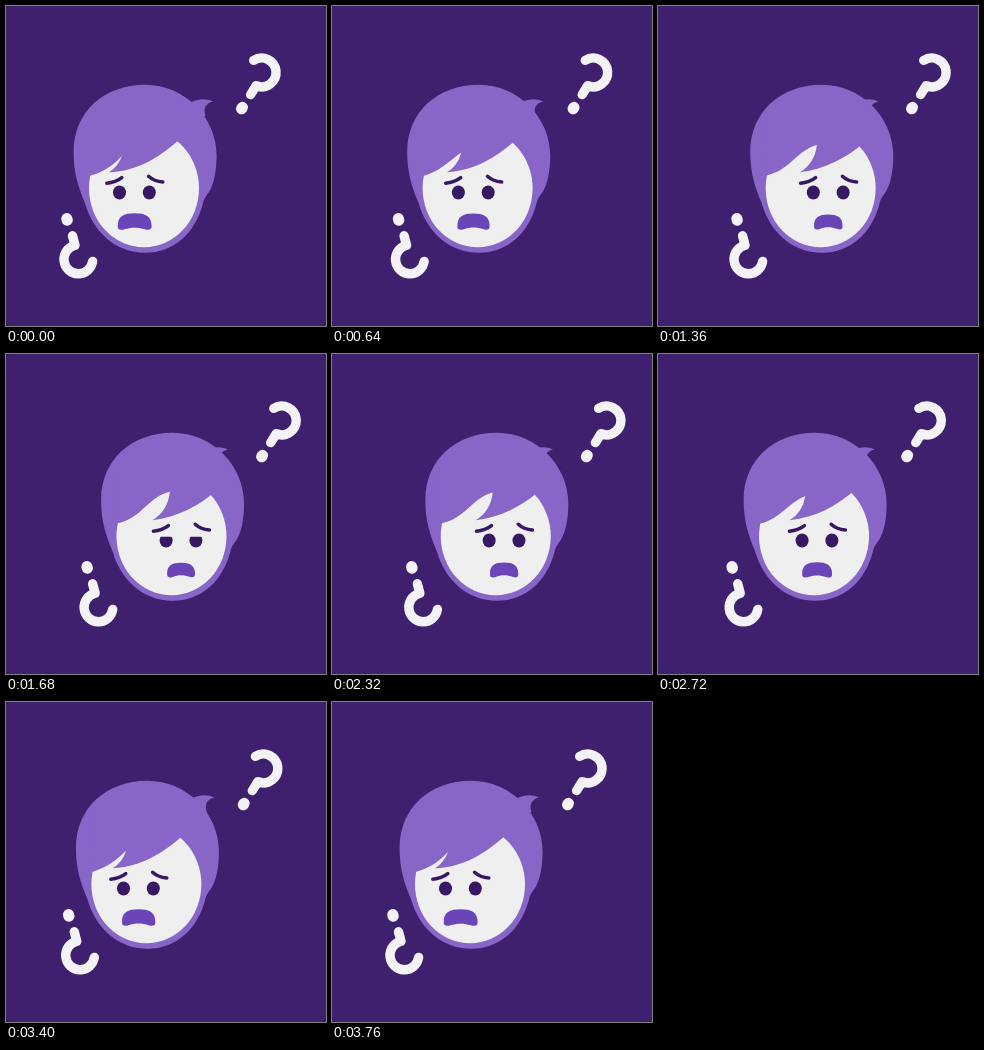
Write an HTML page that moves like this. It is 320 px wide and 320 px high and loops after 3.8 s.

```html
<!DOCTYPE html>
<html lang="en">
<head>
<meta charset="utf-8">
<title>Confused head</title>
<style>
  html, body { margin: 0; width: 100%; height: 100%; overflow: hidden; background: #3f206e; }
  svg { display: block; width: 100vw; height: 100vh; }
  .hair { fill: #8866c8; }
  .skin { fill: #efefef; }
  .dark { fill: #381863; }
  .brow { fill: none; stroke: #381863; stroke-width: 3.5; stroke-linecap: round; }
  .mark path { fill: none; stroke: #f3f2f4; stroke-width: 9.4; stroke-linecap: round; stroke-linejoin: round; }
  .mark .dot { stroke-width: 11.2; }
</style>
</head>
<body>
<svg viewBox="0 0 320 320">
  <g id="marks" class="mark">
    <path d="M247.7 54.4A14.4 14.4 0 1 1 250.1 79.7L244.6 88.6"/>
    <path class="dot" d="M236.4 101.4L235.6 102.7"/>
    <path d="M66.5 229.8L69 239.3A14.4 14.4 0 1 0 86.6 255.4"/>
    <path class="dot" d="M60.8 212.7L61.2 214.1"/>
  </g>
  <path id="tuft" class="hair" d="M177 102C184 95 196 90 207 95.5C200 97 197 102 199.5 110L185 115Z"/>
  <g id="head">
    <path class="hair" d="M67.6 146C67.6 106 98 78.8 139 78.8C179 78.8 210.6 111.5 210.6 150C210.6 166 207.5 179 203 186C200 190.5 197.5 193 196.8 198C189 227 168 246.8 139 246.8C110 246.8 87 226 79 197C72 181 67.6 166 67.6 146Z"/>
    <ellipse class="skin" cx="138" cy="182.3" rx="55" ry="59"/>
  </g>
  <path id="fringe" class="hair"/>
  <g id="eyes">
    <ellipse class="dark" cx="113.5" cy="186.5" rx="6.5" ry="7"/>
    <ellipse class="dark" cx="143.3" cy="186.5" rx="6.5" ry="7"/>
    <rect class="skin lid" x="106" y="178" width="15" height="0"/>
    <rect class="skin lid" x="136" y="178" width="15" height="0"/>
    <path class="brow" d="M100.8 177.2Q109.7 176.6 115.8 171.7"/>
    <path class="brow" d="M142.6 170.3Q148 175.4 156.8 176"/>
  </g>
  <path id="mouth" fill="#6b44b8"/>
</svg>
<script>
const LOOP = 3800, TURN = 1760, BACK = 2000;
const el = id => document.getElementById(id);
const lids = document.querySelectorAll('.lid');
const clamp = v => Math.min(1, Math.max(0, v));
const mix = (a, b, k) => a + (b - a) * k;
const smooth = v => v * v * (3 - 2 * v);

// cubic-bezier(.42, 0, .58, 1)
function ease(x) {
  let lo = 0, hi = 1;
  for (let i = 0; i < 24; i++) {
    const s = (lo + hi) / 2, r = 1 - s;
    if (1.26 * r * r * s + 1.74 * r * s * s + s * s * s < x) lo = s; else hi = s;
  }
  return smooth((lo + hi) / 2);
}

// Hair edge with the head turned left and right
const fringeCmds = ['M', 'C', ' ', ' ', 'Q', ' ', 'C', ' ', ' ', 'L', 'L'];
const fringeLeft = [80, 171, 96, 167, 107, 160, 116, 149.8, 112, 161, 103, 166.3,
  132, 165, 152, 152, 173, 134, 188, 117, 80, 117];
const fringeRight = [108, 170, 136, 166, 141, 143, 164, 137.7, 162, 157, 146.5, 166.3,
  172, 163, 192, 152, 209, 138, 225, 117, 108, 117];

function fringePath(k) {
  const p = fringeLeft.map((v, i) => mix(v, fringeRight[i], k).toFixed(2));
  return fringeCmds.map((c, i) => c + p[2 * i] + ' ' + p[2 * i + 1]).join('') + 'Z';
}

function mouthPath(k) {
  const cx = mix(128.6, 175.2, k), w = mix(17, 14, k);
  const top = mix(207.2, 208.7, k), low = mix(224, 223.6, k);
  const p = (x, y) => (cx + x * w).toFixed(2) + ' ' + y.toFixed(2) + ' ';
  return 'M' + p(-.99, low - 4) +
    'C' + p(-1, top + 3) + p(-.65, top) + p(0, top) +
    'C' + p(.65, top) + p(1, top + 3) + p(1, low - 4) +
    'C' + p(1.02, low) + p(.82, low + .3) + p(.6, low - .8) +
    'C' + p(.25, low - 2.9) + p(-.25, low - 2.9) + p(-.6, low - .7) +
    'C' + p(-.82, low + .4) + p(-1.02, low) + p(-.99, low - 4) + 'Z';
}

const slide = (id, x) => el(id).setAttribute('transform', `translate(${x.toFixed(3)} 0)`);

function draw(t) {
  const k = t < BACK ? ease(clamp(t / TURN)) : 1 - ease(clamp((t - BACK) / TURN));
  slide('marks', 20.2 * k);
  slide('tuft', 15 * k);
  slide('head', 27.6 * k);
  slide('eyes', 46.8 * k);
  el('fringe').setAttribute('d', fringePath(k));
  el('mouth').setAttribute('d', mouthPath(k));
  const shut = smooth(clamp(1 - Math.abs(t - 1840) / 240));
  lids.forEach(lid => lid.setAttribute('height', shut ? 1.5 + 12.5 * shut : 0));
}

let start;
function tick(now) {
  if (start === undefined) start = now;
  draw((now - start) % LOOP);
  requestAnimationFrame(tick);
}
draw(0);
requestAnimationFrame(tick);
</script>
</body>
</html>
```
